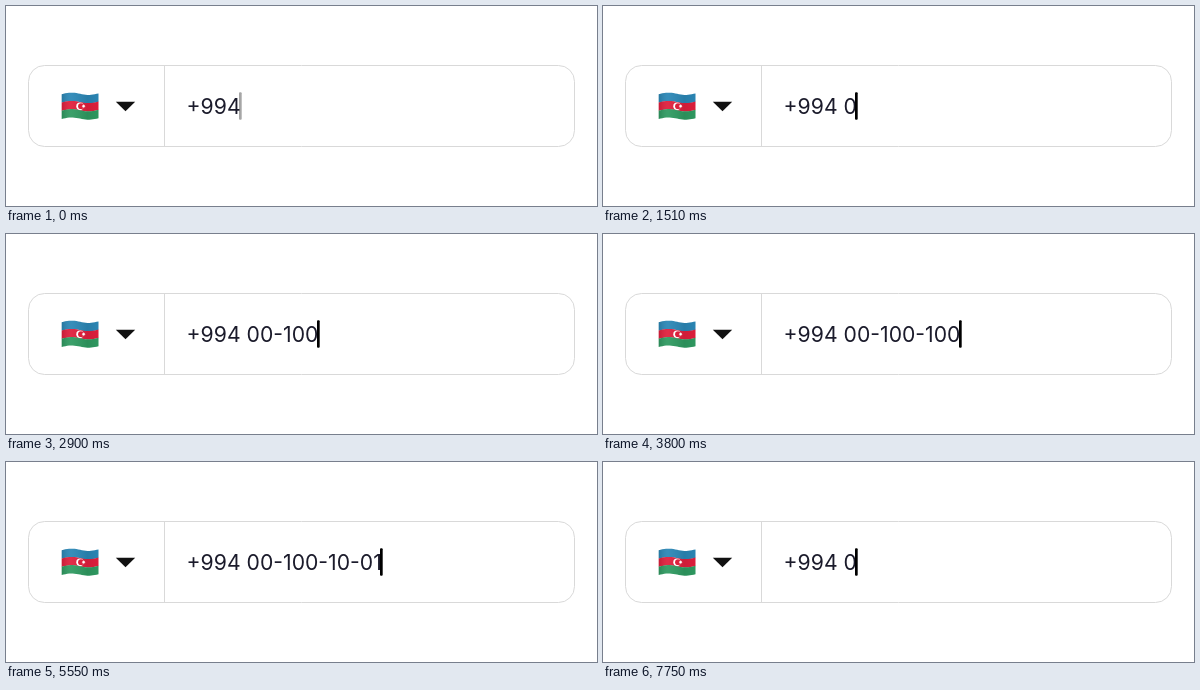
Animation of 591x200 px, one loop 8000 ms. Source, as an HTML page with a canvas:

```html
<!DOCTYPE html>
<html lang="en">
<head>
<meta charset="utf-8">
<title>Phone input</title>
<style>
  html, body { margin: 0; width: 100%; height: 100%; overflow: hidden; background: #fff; }
  canvas { display: block; }
</style>
</head>
<body>
<canvas id="stage" width="591" height="200"></canvas>
<script>
const LOOP = 8000;
const NUMBER = '+994 00-100-10-01';
const TEXT_X = 180.6;
const BASELINE = 108;

// [time, shown length]; a negative length leaves out the last separator until the mask adds it
const TYPING = [
  [0, 4], [1310, -6], [1410, 6], [1770, 7], [2190, -9], [2270, 9],
  [2460, 10], [2750, 11], [3070, -13], [3160, 13], [3450, 14],
  [3800, -16], [4040, 16], [4290, 17],
  [6590, 16], [6700, 15], [6830, 14], [6920, 13], [7100, 11],
  [7360, 10], [7530, 9], [7610, 8], [7680, 7], [7750, 6]
];

// [time, caret opacity]
const CARET = [
  [0, 0.35], [80, 0], [620, 0.35], [700, 0.7], [780, 1],
  [990, 0.7], [1070, 0.35], [1150, 0], [1310, 1],
  [5300, 0.7], [5380, 0.35], [5460, 0], [5550, 1]
];

const ctx = document.getElementById('stage').getContext('2d');

function valueAt(steps, time) {
  return steps.filter(([start]) => start <= time).pop()[1];
}

function shownText(length) {
  if (length > 0) return NUMBER.slice(0, length);
  const end = -length;
  return NUMBER.slice(0, end - 2) + NUMBER[end - 1];
}

function disc(x, y, radius, color) {
  ctx.fillStyle = color;
  ctx.beginPath();
  ctx.arc(x, y, radius, 0, Math.PI * 2);
  ctx.fill();
}

function drawField() {
  ctx.strokeStyle = '#d9d9d9';
  ctx.lineWidth = 1;
  ctx.beginPath();
  ctx.roundRect(22.5, 59.5, 546, 81, 16);
  ctx.moveTo(158.5, 60);
  ctx.lineTo(158.5, 140);
  ctx.stroke();
}

function drawStar(x, y, outer, inner) {
  ctx.beginPath();
  for (let i = 0; i < 16; i++) {
    const angle = i * Math.PI / 8;
    const radius = i % 2 ? inner : outer;
    ctx.lineTo(x + radius * Math.cos(angle), y + radius * Math.sin(angle));
  }
  ctx.fillStyle = '#fff';
  ctx.fill();
}

function drawFlag() {
  const left = 55.7, width = 36.8, top = 88.2, stripe = 8.2;
  const wave = u => -1.3 * Math.sin(u * Math.PI * 2) - 0.8 * u;
  const band = (y, height, fill) => {
    ctx.beginPath();
    for (let u = 0; u <= 1.001; u += 0.05) ctx.lineTo(left + u * width, y + wave(u));
    for (let u = 1; u >= -0.001; u -= 0.05) ctx.lineTo(left + u * width, y + height + wave(u));
    ctx.fillStyle = fill;
    ctx.fill();
  };
  ['#2b87b6', '#e01f3d', '#2f9a61'].forEach((color, i) => band(top + i * stripe, stripe + 0.2, color));

  const shade = ctx.createLinearGradient(left, 0, left + width, 0);
  shade.addColorStop(0, 'rgba(0,0,0,0.12)');
  shade.addColorStop(0.25, 'rgba(255,255,255,0.06)');
  shade.addColorStop(0.7, 'rgba(0,0,0,0.08)');
  shade.addColorStop(1, 'rgba(0,0,0,0.02)');
  band(top, stripe * 3, shade);

  disc(74, 100.2, 3.7, '#fff');
  disc(75, 100.2, 2.9, '#dc203c');
  drawStar(77.6, 100.2, 2, 1);
}

function drawArrow() {
  ctx.fillStyle = '#111';
  ctx.beginPath();
  ctx.moveTo(109.8, 95.8);
  ctx.lineTo(129.2, 95.8);
  ctx.lineTo(119.5, 105.3);
  ctx.fill();
}

function drawInput(time) {
  const text = shownText(valueAt(TYPING, time));
  ctx.font = '21.2px Inter, "Liberation Sans", sans-serif';
  ctx.fillStyle = '#1b1b2b';
  ctx.fillText(text, TEXT_X, BASELINE);

  const caretX = Math.round(TEXT_X + ctx.measureText(text).width - 1.5);
  ctx.globalAlpha = valueAt(CARET, time);
  ctx.fillStyle = '#000';
  ctx.beginPath();
  ctx.roundRect(caretX, 86.3, 2.7, 27.4, 1);
  ctx.fill();
  ctx.globalAlpha = 1;
}

function draw() {
  ctx.fillStyle = '#fff';
  ctx.fillRect(0, 0, 591, 200);
  drawField();
  drawFlag();
  drawArrow();
  drawInput(performance.now() % LOOP);
  requestAnimationFrame(draw);
}

draw();
</script>
</body>
</html>
```
